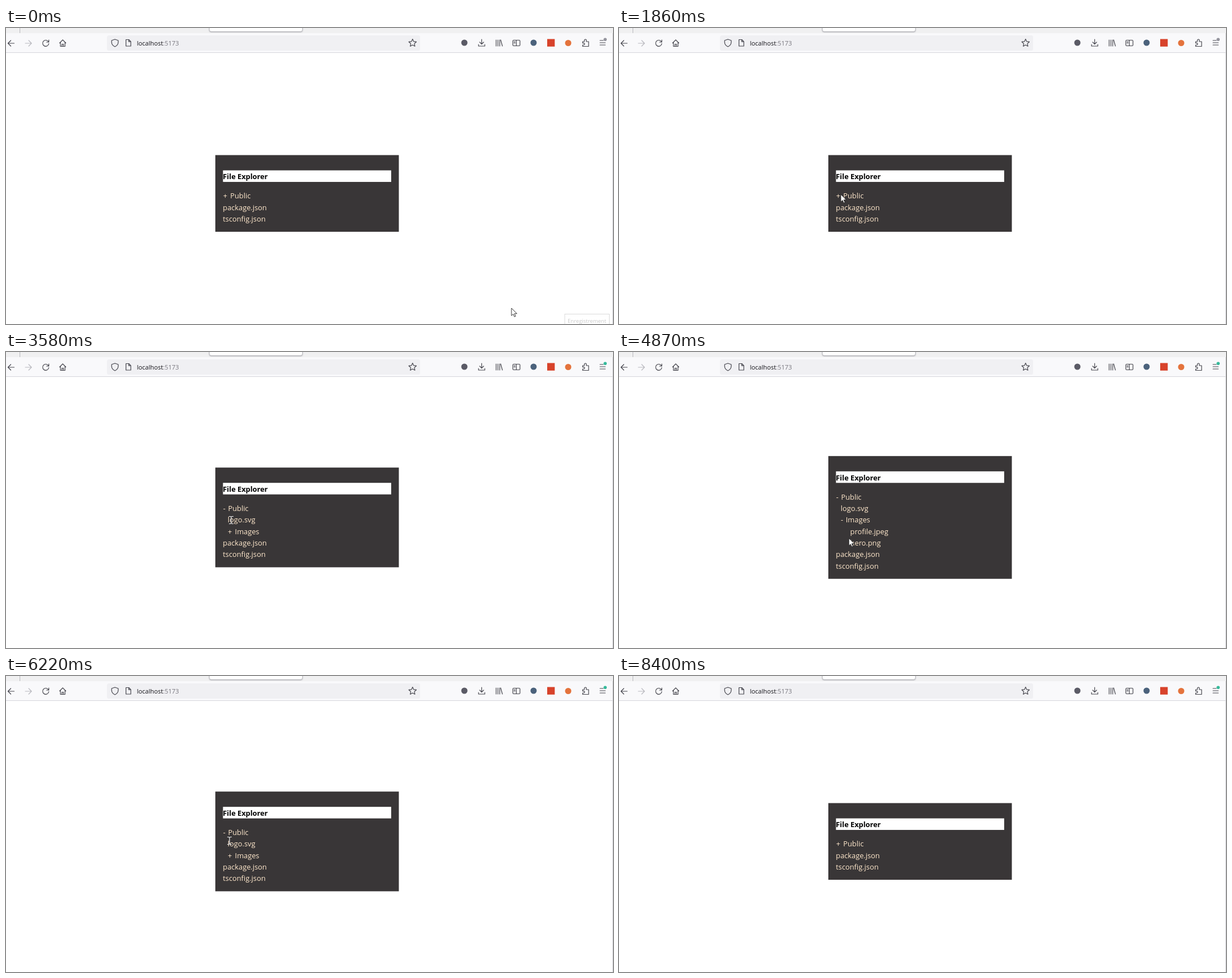
Animation, 1070 px wide and 523 px high, one loop 8.83 s. Source, as an HTML page:

```html
<!DOCTYPE html>
<html lang="en">
<head>
<meta charset="utf-8">
<title>File Explorer</title>
<style>
  html, body { margin: 0; width: 100%; height: 100%; overflow: hidden; background: #fff; }
  svg { display: block; width: 1070px; height: 523px; font: 12.8px "Open Sans", "Noto Sans", sans-serif; }
  .icons { fill: none; stroke: #45454d; stroke-width: 1.2; stroke-linecap: round; stroke-linejoin: round; }
  .row { fill: #ffe8cc; }
</style>
</head>
<body>
<svg viewBox="0 0 1070 523">
  <defs>
    <filter id="soft" x="-5%" y="-100%" width="110%" height="400%"><feGaussianBlur stdDeviation="1.2"/></filter>
  </defs>

  <!-- Browser toolbar -->
  <rect width="1070" height="9.5" fill="#f0f0f1"/>
  <path d="M24.5 0V9" stroke="#b9b9be"/>
  <rect x="358.5" y="-6" width="164" height="13" rx="3" fill="#8f8f96" filter="url(#soft)"/>
  <rect x="359" y="-6" width="163" height="12" rx="3" fill="#fff"/>
  <rect y="9.5" width="1070" height="33.5" fill="#f9f9fb"/>
  <path d="M0 43.5H1070" stroke="#d6d6db"/>
  <path d="M1069.5 9V523" stroke="#d4d4d8"/>
  <rect x="178" y="13" width="552" height="27" rx="3.5" fill="#f0f0f3"/>
  <text x="230.7" y="30.8" font-size="11" fill="#15141a">localhost<tspan fill="#77767e">:5173</tspan></text>

  <g class="icons">
    <path d="M14.5 27H3.5M8.5 22L3.5 27L8.5 32"/>
    <path d="M34 27H45M40 22L45 27L40 32" stroke="#b7b7bd"/>
    <path d="M74.6 24A5.4 5.4 0 1 0 75.4 27.5M75.5 21V25H71.5"/>
    <path d="M94.5 26.5L100 21L105.5 26.5M96 25.5V32.5H104V25.5M98.7 32V28.5H101.3V32"/>
    <path d="M192 20L197.8 22V25.5Q197.5 30.5 192 33Q186.500 30.5 186.200 25.5V22Z"/>
    <path d="M211.500 20.500H216.500L220 24V32H211.500ZM216.300 20.700V24.200H220"/>
    <path id="star"/>
    <path d="M838.5 20V28M835 25L838.5 28.5L842 25M833 29V32H844V29"/>
    <path d="M864 21V32M867.2 21V32M870.4 21V32M872 21L875 32"/>
    <rect x="893.5" y="21.500" width="12.500" height="10" rx="1.500"/>
    <path d="M899.5 21.500V31.500M895.500 24.300H897.500M895.500 26.500H897.500"/>
    <path d="M1016.500 24H1019.500V22Q1019.500 20 1021.300 20T1023 22V24H1027V32.500H1016.500V30H1018Q1020 30 1020 28.300T1018 26.600H1016.500Z"/>
    <path d="M1047 22H1053M1047 26H1056.500M1047 30H1056.500"/>
  </g>
  <circle cx="808" cy="26" r="5.5" fill="#5b5b66"/>
  <circle cx="930" cy="26" r="5.5" fill="#4b627c"/>
  <rect x="954" y="19.500" width="13.300" height="13.300" fill="#d8432b"/>
  <circle cx="991" cy="26.500" r="5.500" fill="#e4733c"/>
  <circle id="badge" cx="1056.200" cy="20.200" r="2.800"/>

  <g id="tooltip">
    <rect x="985" y="505.500" width="78.500" height="30" fill="#fff" stroke="#dadada"/>
    <text x="990" y="521.300" font-size="9.500" fill="#c9c9c9">Enregistrement</text>
  </g>

  <g id="panel"></g>

  <path id="arrow" d="M0 0V13.300L3.100 10.500L5.200 15.200L7.300 14.300L5.300 9.700H9.600Z"
        fill="#fff" stroke="#222" stroke-width=".9" stroke-linejoin="round"/>
  <path id="beam" d="M-4 -6.500H-1.500L0 -5.500L1.500 -6.500H4M0 -5.500V5.500M-4 6.500H-1.500L0 5.500L1.500 6.500H4"
        fill="none" stroke="#f2f2f2" stroke-width="1.200"/>
</svg>

<script>
const LOOP = 8830;
const ROW = 20.35;
const $ = id => document.getElementById(id);

// Folder state from each time on: [time, Public open, Images open]
const states = [
  [0, false, true], [2400, true, true], [3580, true, false],
  [4370, true, true], [6100, true, false], [7120, false, false]
];

// Pointer path: [time, x, y]
const path = [
  [40, 891, 495], [400, 439, 300], [480, 476, 287], [620, 476, 287],
  [1010, 375, 239], [1180, 320, 200], [1400, 320, 200], [1760, 397, 292],
  [1860, 391, 294], [2340, 391, 294], [2460, 387, 298], [2640, 387, 298],
  [2950, 403, 282], [3250, 397, 297], [3750, 397, 297], [4200, 396, 306],
  [4590, 396, 306], [4870, 405, 329], [5100, 452, 325], [5520, 424, 302],
  [5540, 424, 302], [5930, 394, 291], [6370, 394, 291], [6650, 387, 275],
  [6940, 388, 279], [7570, 388, 279], [7670, 603, 117], [8050, 887, 13],
  [8170, 985, 491], [8270, 985, 491], [8400, 989, 512]
];
const hiddenSpans = [[7720, 8050], [8400, LOOP]];
const textSpans = [[3580, 3990], [4890, 5430], [6100, 6460]];

const within = (spans, t) => spans.some(([from, to]) => t >= from && t < to);

function pointerAt(t) {
  const next = path.findIndex(p => p[0] > t);
  if (next === 0) return path[0].slice(1);
  if (next < 0) return path.at(-1).slice(1);
  const [t0, x0, y0] = path[next - 1], [t1, x1, y1] = path[next];
  const k = (t - t0) / (t1 - t0);
  return [x0 + (x1 - x0) * k, y0 + (y1 - y0) * k];
}

const label = (x, y, text) => `<text class="row" x="${x}" y="${y}">${text}</text>`;

function panelMarkup(publicOpen, imagesOpen) {
  const folder = (x, name, open) => y =>
    label(x, y, open ? "-" : "+") + label(x + (open ? 8.8 : 12.6), y, name);
  const file = (x, name) => y => label(x, y, name);

  const rows = [folder(382.7, "Public", publicOpen)];
  if (publicOpen) {
    rows.push(file(390.8, "logo.svg"), folder(391, "Images", imagesOpen));
    if (imagesOpen) rows.push(file(407.6, "profile.jpeg"), file(407.6, "hero.png"));
  }
  rows.push(file(382.3, "package.json"), file(382.3, "tsconfig.json"));

  const height = 74.45 + rows.length * ROW;
  const top = 292.3 - height / 2;
  return `<rect x="369" y="${top}" width="323.500" height="${height}" fill="#393637"/>
    <rect x="382.500" y="${top + 27}" width="296.500" height="20.400" fill="#fff"/>
    <text x="382.300" y="${top + 42.7}" font-weight="700">File Explorer</text>` +
    rows.map((draw, i) => draw(top + 76.8 + i * ROW)).join("");
}

function starPath(cx, cy, radius) {
  const points = Array.from({ length: 10 }, (_, i) => {
    const r = i % 2 ? radius * .48 : radius;
    const a = i * Math.PI / 5 - Math.PI / 2;
    return `${cx + r * Math.cos(a)} ${cy + r * Math.sin(a)}`;
  });
  return `M${points.join("L")}Z`;
}

let shownState;
function render(t) {
  const state = states.findLast(s => s[0] <= t);
  if (state !== shownState) {
    $("panel").innerHTML = panelMarkup(state[1], state[2]);
    shownState = state;
  }
  $("badge").setAttribute("fill", t < 2400 ? "#94949d" : "#35b99a");
  $("tooltip").style.opacity = Math.max(0, Math.min(1, 1 - (t - 50) / 120));

  const [x, y] = pointerAt(t);
  const visible = !within(hiddenSpans, t);
  const overText = within(textSpans, t);
  for (const [id, on] of [["arrow", visible && !overText], ["beam", visible && overText]]) {
    $(id).style.display = on ? "" : "none";
    $(id).setAttribute("transform", `translate(${x} ${y})`);
  }
}

$("star").setAttribute("d", starPath(716.7, 26.6, 7));
const start = performance.now();
function tick() {
  render((performance.now() - start) % LOOP);
  requestAnimationFrame(tick);
}
tick();
</script>
</body>
</html>
```
